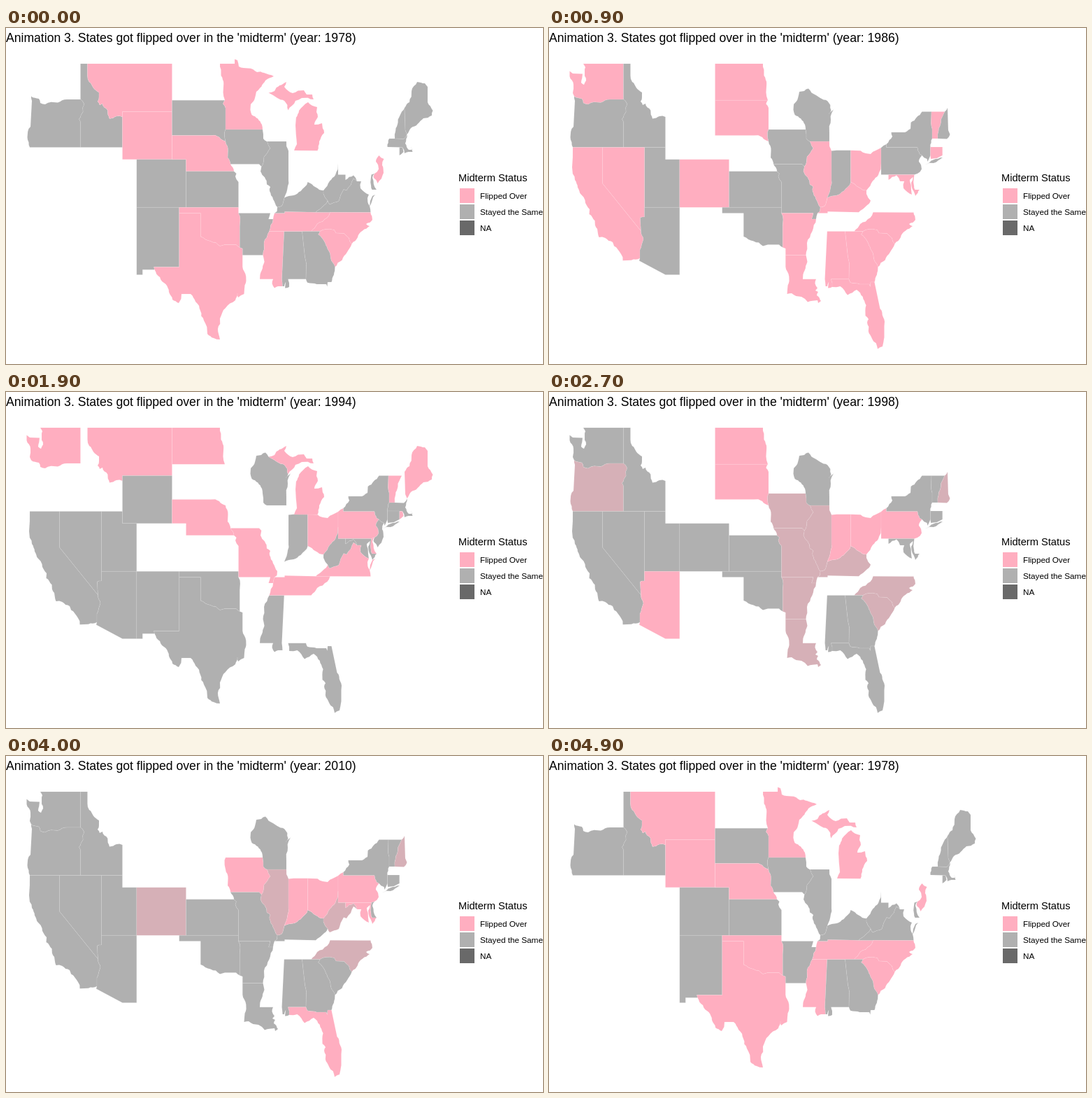
Recreate the animation shown at these times as an HTML page. Size 768 by 480 pixels, loop 5 s.

```html
<!DOCTYPE html>
<html lang="en">
<head>
<meta charset="utf-8">
<title>Midterm status</title>
<style>
html, body { margin: 0; width: 100%; height: 100%; overflow: hidden; background: #fff; }
svg { display: block; width: 768px; height: 480px; font-family: "Liberation Sans", Arial, sans-serif; }
#map path { stroke: #fff; stroke-width: .1; }
</style>
</head>
<body>
<svg viewBox="0 0 768 480">
  <text id="title" x="0" y="20" font-size="17.6"></text>
  <g id="map"></g>
  <g id="legend"><text x="647" y="219" font-size="14.67">Midterm Status</text></g>
</svg>
<script>
const PINK = '#ffaec0', GRAY = '#b0b0b0', BLEND = '#d6b0b7', DARK = '#696969';

// Key points of winding borders, each shared by the states on both sides.
const borders = {
  columbia: '106.5,102 87,102 74,106.5 56,109 49,107 47,101 36,97.5',
  snake: '106.5,102 111.5,108 104.5,130 106.5,134',
  bitterroot: '116.5,68 119,77 133,92 131,105 134,110 138,108 148,129.5 158,126 166.5,127',
  mead: '136.5,270 130.5,271 131.5,290',
  colorado: '131.5,290 135,302 130,317 130,329',
  redNorth: '306,51 307.5,68 310.5,92 313,103.3',
  bigStone: '313,103.3 310.5,108.5 314,114',
  bigSioux: '314,145 312.5,149 314,162',
  niobrara: '293,153.5 305,156 314,162',
  platte: '314,162 317.5,175 321,194.5',
  kaw: '326,204.8 329.5,208 328,212 332.5,220',
  red: '278.3,298 292.5,304.5 306,311.5 313,309.5 329,309.5 334.3,313.5',
  sabine: '338.3,341 343.3,355 340.5,380',
  stCroix: '358,91 356,100 350,109 351.5,124 366,138 367,145',
  missWI: '367,145 368,158 373,162',
  missIA: '373,162 378,172 369,184 365.3,198',
  missMO: '365.3,198 364,205 373,223.5 378,227 377,233 388,256',
  missTN: '382,273 376.5,290.5',
  missAR: '376.5,290.5 369,307 367.5,324.5',
  missLA: '367.5,324.5 369.5,334 363,358.7',
  pearl: '382,358.7 380.5,365 384,371.5',
  menominee: '375.5,92.5 388,100 398,104 403.5,117.5',
  wabash: '404,217.5 403,226 398,242.5',
  ohioWest: '388,256 394.5,254 398,242.5',
  ohioMid: '398,242.5 411.5,239 421.5,233 431.5,220',
  ohioEast: '431.5,220 443,227.5 454,232',
  ohioUpper: '454,232 463,218.5 471,210 475,193',
  tug: '454,232 454,237 460,246.5',
  cumberland: '460,246.5 453,255 443,263.3',
  allegheny: '460,246.5 463,252 476,247 483,230.5 487,232 497,215 502,219',
  potomacUpper: '485.5,217 497,210.5 502,219',
  potomac: '502,219 508,219 507,229 519,238',
  smoky: '463.5,263.3 459.5,271 445,280 436.5,290.5',
  carolina: '449,290.5 457,287.5 469.5,288.5 472,293 483.5,293.5 494.5,308.5',
  savannah: '449,290.5 446.5,295 460,316 470.5,341.5',
  chattahoochee: '427.5,327 429.5,336 429,358.7',
  stMarys: '429,358.7 431,363.7 458,366 459.5,369.5 460,363 465.5,363',
  perdido: '403.5,358.7 405,364 405,370',
  delaware: '527,170.5 530,180 533.5,182',
  trenton: '533.5,182 529,191 533,201.5 527,208',
  champlain: '547,119.5 546.5,136 548,144 548,158',
  connecticut: '566,119.5 560.5,135 556,158',
  kittery: '570,114 571,146 573.5,152'
};

// Outline tokens: a point, a level (x) or upright (y) run, or a border, reversed by "-".
const outlines = {
  WA: '49,51 x106.5 y102 columbia 34,93 35,81 29.5,69 29.5,61.5 34,65 48,65.5 46,78 50,81 53,75 51,62 52,56',
  OR: '-columbia snake y170.5 x34 30.5,156 35,141 37,104',
  ID: '106.5,51 x116.5 bitterroot y170.5 x106.5 -snake',
  MT: '116.5,51 x237.5 y119.5 x166.5 -bitterroot',
  WY: '166.5,119.5 x237.5 y187.7 x166.5',
  UT: '136.5,170.5 x166.5 y187.7 x186.8 y256.3 x136.5',
  CO: '186.8,187.7 x257.5 y256.3 x186.8',
  NV: '76.5,170.5 x136.5 mead 76.5,222',
  CA: '34,170.5 x76.5 y222 131.5,290 colorado 105.5,332.3 103,323 93,311.5 91,306 80.5,300 71.5,299 69,287 57.5,266 58,259 51.5,246 46,238 37,217 33,199',
  AZ: '136.5,256.3 x186.8 y352.5 x166.5 129,332.5 -colorado -mead',
  NM: '186.8,256.3 x247.7 y341.5 x211.5 212.5,345.3 x195.3 y352.5 x186.8',
  ND: '237.5,51 redNorth x237.5',
  SD: '237.5,103.3 bigStone y145 bigSioux -niobrara x237.5',
  NE: '237.5,153.5 niobrara platte 326,204.8 x257.5 y187.7 x237.5',
  KS: '257.5,204.8 kaw y256.3 x257.5',
  OK: '247.7,256.3 x332.5 y264.6 334.3,283 y313.5 -red y264.6 x247.7',
  TX: '247.7,264.6 x278.3 red 338.3,315 y341 sabine 332,385 331,379 328,389 314,400 306,415 303,430 306,445 297,443 288,437 283,418 271,391 264,380 251,380 247,393 238,388 228.5,366 212.5,345.3 211.5,341.5 x247.7',
  MN: '306,51 x327 y44.5 331,46 333,55 359,63 369,64 383,69 371,75 stCroix x314 y114 -bigStone -redNorth',
  IA: '314,145 missWI missIA 362,194.5 x321 -platte -bigSioux',
  MO: '321,194.5 x362 missMO 387.5,262 384,264.6 382,273 x375.5 378,264.6 x332.5 -kaw',
  AR: '332.5,264.6 x378 375.5,273 missTN missAR x338.3 y315 334.3,313.5 y283',
  LA: '338.3,324.5 missLA pearl 381,375 385,377 383,382 389,390 385,393 384,389 370,391.5 361,384 347,379 -sabine',
  MS: '376.5,290.5 x397.8 394.5,358.7 395.5,369 389,369 -pearl x363 -missLA -missAR',
  AL: '397.8,290.5 x423.5 chattahoochee perdido 399,371.5 400,363 398,369 395.5,369 394.5,358.7',
  TN: '384,264.6 x398.5 y262.3 443,263.3 smoky x376.5 -missTN',
  KY: 'ohioWest ohioMid ohioEast tug cumberland 398.5,262.3 y264.6 x384 387.5,262',
  IL: '373,162 x401 404,175.5 wabash -ohioWest -missMO -missIA',
  IN: '404,175.5 411.5,174.7 x431.5 y220 -ohioMid -wabash',
  OH: '431.5,174.7 445.5,175.3 453,179 460,180 475,171 y193 -ohioUpper -ohioEast',
  WI: '358,91 371,86.5 menominee 400,123 409,114 403,131 401,150 y162 x373 -missWI -stCroix',
  MI: '412,175 416,166 414,139 419,118 432,106 445,113 446,127 441,138 452,136 455,150 448,162 445.5,175.3/menominee 414,104 423,100 440,102 438,95 430,95 426,89 410,93 398,84 401,77 384,90',
  PA: '475,171 482.5,166 y170.5 x527 delaware trenton 522.5,209.5 x475',
  NY: '482.5,166 491,155 489.5,149 506,149 517,144 517.5,135 533.5,119.5 champlain 545.5,170 y182 541.5,191 540.5,187 533.5,182 -delaware x482.5/538,195 563,185 550,193',
  VT: '547,119.5 connecticut x548 -champlain',
  NH: '566,119.5 kittery 569,158.5 556,158 -connecticut',
  ME: '570,114 577,106 580,90 588,77 599,79 603,84 y106 610.5,118 609,125 597,129 579,143 573.5,152 -kittery',
  MA: '548,158 x556 569,158.5 573.5,152 571,165 576,174 580,174 579,169 581.5,177 570,179 567,170.5 545.5,170',
  RI: '562.7,170.5 x567 568.5,177 562.7,182',
  CT: '545.5,170 x562.7 y182 546,187 545.5,182',
  NJ: '533.5,182 540.5,187 538,196 540,207 531.5,222 525.5,213 527,208 -trenton',
  DE: '522.5,209.5 527,208 524,214 530,231 x523.5',
  MD: '485.5,209.5 x522.5 523.5,231 x530 524,240 518,221 520.5,213 516,217 518,231 -potomac -potomacUpper',
  VA: '-cumberland allegheny potomac 517,243 520,254 521.5,263.6/528,238 524,240 520,255',
  WV: '475,193 y209.5 x485.5 potomacUpper -allegheny -tug ohioUpper',
  NC: '463.5,263.3 521.5,263.6 524,274 515,280 520,283 503,299 -carolina -smoky',
  SC: 'carolina 488,320 -savannah',
  GA: '423.5,290.5 savannah 465.5,363 -stMarys -chattahoochee',
  FL: '403.5,358.7 stMarys 473.5,401 479.5,426 y442 477,455 470,458.5 462,444 455,421 457,416 452.5,411 453.5,396 440,374 427,381.5 416.5,369 -perdido'
};

function tracePoints(outline) {
  const points = [];
  for (const token of outline.split(' ')) {
    const last = points.at(-1);
    const name = token.replace('-', '');
    if (borders[name]) {
      const line = tracePoints(borders[name]);
      points.push(...(token === name ? line : line.reverse()));
    } else if (token[0] === 'x') points.push([+token.slice(1), last[1]]);
    else if (token[0] === 'y') points.push([last[0], +token.slice(1)]);
    else points.push(token.split(',').map(Number));
  }
  return points;
}

// Short slanted runs get a natural wiggle, the same from either end.
function wiggle(a, b) {
  const dx = b[0] - a[0], dy = b[1] - a[1], length = Math.hypot(dx, dy);
  if (length < 5 || length > 30 || Math.abs(dx) < 1 || Math.abs(dy) < 1) return [a];
  if (dx < 0) return [a, ...wiggle(b, a).slice(1).reverse()];
  const noise = Math.sin(a[0] * 12.9 + a[1] * 78.2 + b[0] * 37.7 + b[1] * 4.1) * 43758;
  const shift = (noise - Math.floor(noise) - .5) * .24;
  const mid = [(a[0] + b[0]) / 2 - dy * shift, (a[1] + b[1]) / 2 + dx * shift];
  return [...wiggle(a, mid), ...wiggle(mid, b)];
}

function pathData(outline) {
  return outline.split('/').map(piece => {
    const points = tracePoints(piece);
    const rough = points.flatMap((p, i) => wiggle(p, points[(i + 1) % points.length]));
    return `M${rough.join(' ')}Z`;
  }).join('');
}

// Start in ms, flipped states, unchanged states; the years are four apart.
const steps = [
  [0, 'MT WY NE OK TX MN MI MS TN NC SC NJ', 'OR ID SD CO NM KS IA IL AR AL GA KY WV VA DE ME NH MA RI'],
  [400, 'AZ FL ME MA MI MS MT NE NJ NM NY ND OH RI TN TX WA WI', 'CA CT DE IN MD MO NV PA UT VT VA WV WY'],
  [900, 'WA CA NV CO ND SD IL OH KY AR LA AL GA FL NC SC MD CT VT', 'OR ID UT AZ KS OK MO IA WI IN PA NY NH'],
  [1400, 'AL DE IL MI MT NE NJ OK OR TN', 'CO ID IN IA KS KY ME MA NH NM NC RI SC SD TX WV WY'],
  [1900, 'WA MT ND NE MO MI OH PA VT ME RI DE VA TN', 'CA NV UT AZ NM WY TX OK WI IN NY MA CT NJ MD WV MS FL'],
  [2400, 'AZ ND SD IA IL MO IN OH PA NH KY NC SC', 'WA OR ID CA NV UT CO KS OK AR LA WI AL GA FL NY VT CT MD'],
  [2800, 'OR MT SD NM AR LA WV ME', 'ID WY NE CO TX OK IA MO IL MI KY TN NC SC GA AL NH NJ DE RI'],
  [3300, 'FL ME MO MT NE NM ND OH VA WV', 'AZ CA CT DE MD MA MI MS NV NJ NY PA RI TN TX UT WA WI WY'],
  [3700, 'IA IL IN OH PA MD FL NH NC WV', 'WA OR ID CA NV UT AZ CO KS OK MO AR LA WI KY AL GA SC NY VT CT DE'],
  [4100, 'CO IA ME', 'AR DE GA ID IL KY LA MA MI MS MT NE NH NJ NM NC OK OR RI SC SD TN TX VA WV WY'],
  [4500, 'AZ ME MI MT OH PA WV WI', 'CT DE FL IN MD MA MS MO NE NV NJ NM NY ND RI TN TX UT VA WA WY']
].map(([start, flipped, same], i) => {
  const fill = {};
  flipped.split(' ').forEach(s => fill[s] = PINK);
  same.split(' ').forEach(s => fill[s] = GRAY);
  return { start, year: 1978 + 4 * i, fill };
});
const LOOP = 5000, WRAP = 4900, BLEND_MS = 100;

function add(parent, tag, attrs, text = '') {
  const el = document.createElementNS('http://www.w3.org/2000/svg', tag);
  for (const key in attrs) el.setAttribute(key, attrs[key]);
  el.textContent = text;
  parent.append(el);
  return el;
}

const byId = id => document.getElementById(id);
const paths = {};
for (const state in outlines) paths[state] = add(byId('map'), 'path', { d: pathData(outlines[state]) });

[['Flipped Over', PINK], ['Stayed the Same', GRAY], ['NA', DARK]].forEach(([label, fill], i) => {
  const y = 229 + i * 23;
  add(byId('legend'), 'rect', { x: 649, y, width: 21, height: 21, fill });
  add(byId('legend'), 'text', { x: 678, y: y + 15, 'font-size': 11.73 }, label);
});

let shown = '';
function draw(time) {
  const t = time % LOOP;
  const i = t >= WRAP ? 0 : steps.findLastIndex(s => s.start <= t);
  const now = steps[i], next = steps[(i + 1) % steps.length];
  const blending = t < WRAP && t >= (next.start || WRAP) - BLEND_MS;
  const key = now.year + '/' + blending;
  if (key === shown) return;
  shown = key;
  byId('title').textContent = `Animation 3. States got flipped over in the 'midterm' (year: ${now.year})`;
  for (const state in paths) {
    const from = now.fill[state], to = next.fill[state];
    const mixed = blending && from && to && from !== to;
    paths[state].setAttribute('fill', mixed ? BLEND : from);
    paths[state].style.display = from ? '' : 'none';
  }
}

const begin = performance.now();
function tick() {
  draw(performance.now() - begin);
  requestAnimationFrame(tick);
}
tick();
</script>
</body>
</html>
```
